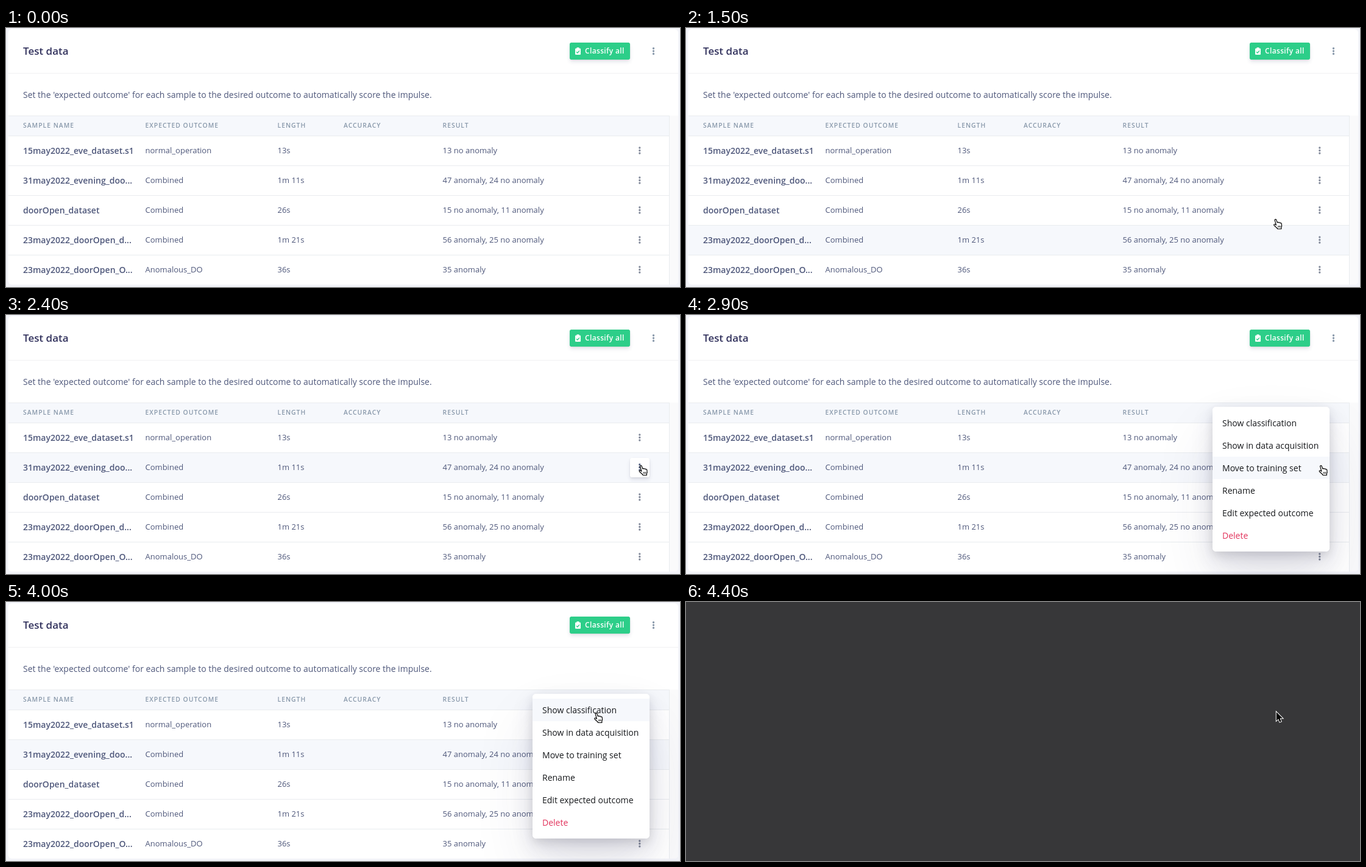
Animation of 1106x426 px, one loop 4790 ms. Source, as an HTML page with a canvas:

```html
<!DOCTYPE html>
<html lang="en">
<head>
<meta charset="utf-8">
<title>Test data</title>
<style>
  html, body { margin: 0; width: 100%; height: 100%; overflow: hidden; background: #f3f4f9; }
  canvas { display: block; width: 1106px; height: 426px; }
</style>
</head>
<body>
<canvas id="stage" width="1106" height="426"></canvas>
<script>
const ctx = document.getElementById('stage').getContext('2d');
const LOOP = 4790, STEP = 100;
const INK = '#4f587b', MUTED = '#8898aa', TINT = '#f6f8fc', LINE = '#e9ecef';
const COLUMNS = [28, 228.5, 445.5, 554, 716.5];
const HEADS = ['SAMPLE NAME', 'EXPECTED OUTCOME', 'LENGTH', 'ACCURACY', 'RESULT'];
const ROWS = [
  ['15may2022_eve_dataset.s1', 'normal_operation', '13s', '', '13 no anomaly'],
  ['31may2022_evening_doo...', 'Combined', '1m 11s', '', '47 anomaly, 24 no anomaly'],
  ['doorOpen_dataset', 'Combined', '26s', '', '15 no anomaly, 11 anomaly'],
  ['23may2022_doorOpen_d...', 'Combined', '1m 21s', '', '56 anomaly, 25 no anomaly'],
  ['23may2022_doorOpen_O...', 'Anomalous_DO', '36s', '', '35 anomaly']
];
const MENU = ['Show classification', 'Show in data acquisition', 'Move to training set',
  'Rename', 'Edit expected outcome', 'Delete'];
const ROW_TOP = 178, ROW_HEIGHT = 49, ITEM_TOP = 159, ITEM_HEIGHT = 37;

const HAND = new Path2D('M2.2 2.3C1.6 .6 4 0 4.7 1.6L6.3 6C6.7 5 8.3 5 8.7 6.3C9.1 5.4 10.8 5.6 11.1 7' +
  'C11.7 6.4 13 6.7 13.3 8C13.7 10 14.1 12 12.8 14V16.5H6.8C6.2 14.5 2.9 12.6 1 10.6C.1 9.4 1.6 8.2 2.9 9.1L4.4 10.2Z');
const KNUCKLES = new Path2D('M7.7 11.2v3M9.4 11.2v3M11.1 11.2v3');
const ARROW = new Path2D('M0 0V14.2L3.3 11.2L5.5 16.4L7.9 15.4L5.7 10.3H10.2Z');

function text(str, x, y, size, color, weight = 400, spacing = 0) {
  ctx.font = `${weight} ${size}px "Open Sans", sans-serif`;
  ctx.letterSpacing = spacing + 'px';
  ctx.fillStyle = color;
  ctx.fillText(str, x, y);
}

function rect(x, y, w, h, color) {
  ctx.fillStyle = color;
  ctx.fillRect(x, y, w, h);
}

// Each shadow is [offsetY, blur, color].
function panel(x, y, w, h, radius, color, shadows = []) {
  ctx.beginPath();
  ctx.roundRect(x, y, w, h, radius);
  ctx.fillStyle = color;
  for (const [offset, blur, shade] of shadows) {
    ctx.shadowOffsetY = offset;
    ctx.shadowBlur = blur;
    ctx.shadowColor = shade;
    ctx.fill();
  }
  ctx.shadowColor = 'transparent';
  ctx.fill();
}

function dots(x, y, color) {
  ctx.fillStyle = color;
  for (const dy of [-4.5, 0, 4.5]) {
    ctx.beginPath();
    ctx.arc(x, y + dy, 1.65, 0, 7);
    ctx.fill();
  }
}

const easeOut = u => Math.sin(u * Math.PI / 2);
const smooth = u => u * u * (3 - 2 * u);

// Centre of the hand: up through the rows, to the row button, then up the menu.
function handAt(t) {
  if (t < 1000) return null;
  const glide = (start, length, ease, x0, y0, x1, y1) => {
    const k = ease(Math.min(1, Math.max(0, (t - start) / length)));
    return { x: x0 + (x1 - x0) * k, y: y0 + (y1 - y0) * k };
  };
  if (t < 1500) return glide(1000, 500, u => u, 925, 393, 971, 322.5);
  if (t < 3300) return glide(1500, 600, easeOut, 971, 322.5, 1045.5, 255.5);
  return glide(3300, 600, smooth, 1045.5, 255.5, 972, 190.5);
}

function drawHand({ x, y }) {
  ctx.save();
  ctx.translate(x - 7, y - 8.5);
  ctx.lineWidth = 1.2;
  ctx.lineJoin = 'round';
  ctx.strokeStyle = '#000';
  ctx.fillStyle = '#fff';
  ctx.fill(HAND);
  ctx.stroke(HAND);
  ctx.lineWidth = 0.8;
  ctx.stroke(KNUCKLES);
  ctx.restore();
}

function drawArrow(x, y) {
  ctx.save();
  ctx.translate(x, y);
  ctx.lineWidth = 2;
  ctx.strokeStyle = '#fff';
  ctx.stroke(ARROW);
  ctx.fillStyle = '#000';
  ctx.fill(ARROW);
  ctx.restore();
}

function drawHeader() {
  text('Test data', 28, 43.5, 17, '#32325d', 600);
  panel(925, 24, 99, 28, 4, '#2dce89', [[4, 6, 'rgba(50,50,93,.11)'], [1, 3, 'rgba(0,0,0,.08)']]);
  panel(934, 33.5, 9, 10.5, 1.3, '#fff');
  panel(936.4, 32, 4.2, 3, 1, '#fff');
  ctx.strokeStyle = '#2dce89';
  ctx.lineWidth = 1.4;
  ctx.stroke(new Path2D('M936 39.2L937.8 41L941 37.4'));
  text('Classify all', 950, 42, 12, '#fff', 600, 0.35);
  dots(1062.5, 38, MUTED);
  rect(4, 74, 1099, 1, '#f0f1f3');
  text("Set the 'expected outcome' for each sample to the desired outcome to automatically score the impulse.",
    28, 115, 14, INK);
}

function drawTable(hovered, buttonHovered) {
  rect(1089, 144, 14, 278, '#fafafb');
  rect(4, 144, 1084, 34, TINT);
  rect(4, 144, 1084, 1, LINE);
  HEADS.forEach((head, i) => text(head, COLUMNS[i], 164, 10.4, MUTED, 600, 1));
  ROWS.forEach((row, r) => {
    const top = ROW_TOP + r * ROW_HEIGHT, mid = top + 23.5;
    if (r === hovered) rect(4, top, 1084, ROW_HEIGHT - 1, TINT);
    rect(4, top - 1, 1084, 1, LINE);
    row.forEach((cell, i) => i
      ? text(cell, COLUMNS[i], top + 28, 13, INK)
      : text(cell, COLUMNS[i], top + 29, 14, INK, 600));
    const pressed = buttonHovered && r === 1;
    if (pressed) panel(1024, 235, 32, 32, 4, '#fff', [[4, 6, 'rgba(50,50,93,.11)'], [1, 3, 'rgba(0,0,0,.08)']]);
    dots(1039.8, mid, pressed ? '#525f7f' : '#858c9c');
  });
  rect(1088, 144, 1, 278, LINE);
}

function drawMenu(hovered, active) {
  panel(864, 151, 192, 238, 6, '#fff', [
    [50, 100, 'rgba(50,50,93,.1)'], [15, 35, 'rgba(50,50,93,.15)'], [5, 15, 'rgba(0,0,0,.1)']]);
  MENU.forEach((label, i) => {
    const top = ITEM_TOP + i * ITEM_HEIGHT, selected = active && i === 0;
    if (i === hovered) rect(864, top, 192, ITEM_HEIGHT, selected ? '#5e72e4' : TINT);
    text(label, 880, top + 24, 14, selected ? '#fff' : label === 'Delete' ? '#e2335c' : '#16181b');
  });
}

function draw(t) {
  if (t >= 4400) {
    rect(0, 0, 1106, 426, '#373739');
    drawArrow(968.8, 181);
    return;
  }
  rect(0, 0, 1106, 426, '#f3f4f9');
  panel(3.5, 2, 1099.5, 420, 6, '#fff');

  // Row hover trails the pointer by one step.
  const hand = handAt(t), trail = handAt(t - STEP), menuOpen = t >= 2900;
  const row = menuOpen ? 1 : trail ? Math.floor((trail.y - 8 - ROW_TOP) / ROW_HEIGHT) : -1;
  const onButton = !menuOpen && trail && trail.x > 1027 && trail.y < 275;

  ctx.save();
  ctx.beginPath();
  ctx.roundRect(3.5, 2, 1099.5, 420, 6);
  ctx.clip();
  drawHeader();
  drawTable(row, onButton);
  ctx.restore();

  const clicked = t >= 4300;
  if (menuOpen) drawMenu(Math.floor((hand.y - 8 - ITEM_TOP) / ITEM_HEIGHT), clicked);
  if (clicked) drawArrow(968.8, 181);
  else if (hand) drawHand(hand);
}

const start = performance.now();
function tick() {
  const t = (performance.now() - start) % LOOP;
  draw(Math.floor(t / STEP) * STEP);
  requestAnimationFrame(tick);
}
tick();
</script>
</body>
</html>
```
